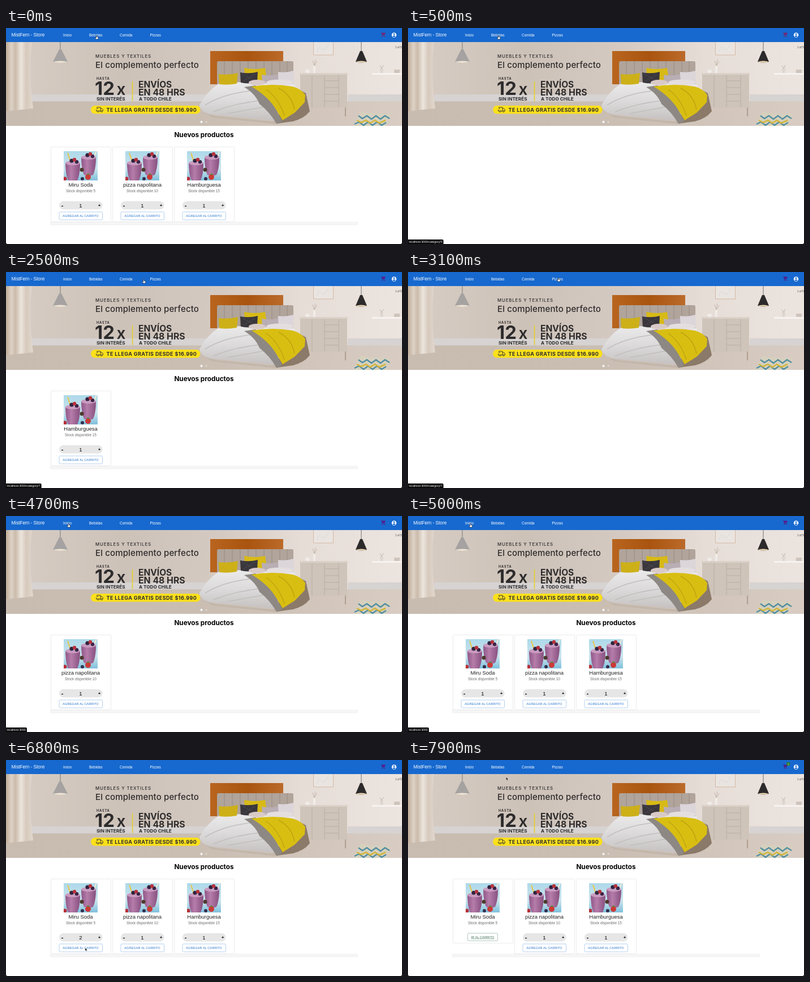
Animation, 700 px wide and 384 px high, one loop 8 s. Source, as an HTML page:

```html
<!DOCTYPE html>
<html lang="es">
<head>
<meta charset="utf-8">
<title>Tienda</title>
<style>
html, body { margin: 0; width: 100%; height: 100%; overflow: hidden; background: #fff }
svg { display: block; width: 700px; height: 384px; font-family: "Liberation Sans", Arial, sans-serif }
.ad { font-family: Inter, "Open Sans", sans-serif; font-weight: 700; fill: #2d2b2c }
.mid { text-anchor: middle }
</style>
</head>
<body>
<svg viewBox="0 0 700 384">
<defs>
  <linearGradient id="wall"><stop offset="0" stop-color="#d8cdc4"/><stop offset=".3" stop-color="#cdc2b8"/><stop offset=".55" stop-color="#d5cac2"/><stop offset=".75" stop-color="#e6ddd7"/><stop offset="1" stop-color="#ece4df"/></linearGradient>
  <linearGradient id="floor"><stop stop-color="#c8bcb0"/><stop offset=".5" stop-color="#cabeb3"/><stop offset="1" stop-color="#d8ccc3"/></linearGradient>
  <linearGradient id="curtain"><stop stop-color="#bfab97"/><stop offset=".2" stop-color="#ddd2c6"/><stop offset=".35" stop-color="#cbbbaa"/><stop offset=".55" stop-color="#ece5dd"/><stop offset=".75" stop-color="#d6c9bc"/><stop offset="1" stop-color="#e2d9cf"/></linearGradient>
  <linearGradient id="wood"><stop stop-color="#b9651f"/><stop offset=".5" stop-color="#a9540f"/><stop offset="1" stop-color="#bb6a2a"/></linearGradient>
  <linearGradient id="sheet" x2="0" y2="1"><stop stop-color="#ebeaeb"/><stop offset=".5" stop-color="#dcdadb"/><stop offset="1" stop-color="#c6c2c1"/></linearGradient>
  <linearGradient id="sky" x2="0" y2="1"><stop stop-color="#add9ea"/><stop offset=".6" stop-color="#cbe4ec"/><stop offset="1" stop-color="#7fc0dc"/></linearGradient>
  <linearGradient id="shake"><stop stop-color="#8f5788"/><stop offset=".4" stop-color="#b67daa"/><stop offset="1" stop-color="#87507f"/></linearGradient>
  <clipPath id="stage"><path d="M0 25H700V174H0z"/></clipPath>
  <g id="glass">
    <path d="M-13 0H13Q13 20 8 31 0 35-8 31-13 20-13 0" fill="url(#shake)"/>
    <ellipse rx="13" ry="4" fill="#c99bbf"/>
    <circle cx="-2" cy="-4" r="3.6" fill="#2f2440"/><circle cx="7" cy="-2" r="3.2" fill="#3b2547"/>
    <circle cx="3" cy="-6" r="3.2" fill="#b8323a"/>
  </g>
  <symbol id="photo" viewBox="0 0 60 52">
    <path d="M0 0H60V52H0z" fill="url(#sky)"/>
    <path d="M13 22 7 3" stroke="#e9c648" stroke-width="2"/><path d="M53 10 58 0" stroke="#f3ead0" stroke-width="2"/>
    <use href="#glass" x="44" y="11"/><use href="#glass" x="16" y="21"/>
    <circle cx="32" cy="33" r="3.5" fill="#4b3a2c"/><circle cx="2" cy="49" r="3.5" fill="#b8323a"/>
    <circle cx="43" cy="46" r="5" fill="#cc3a37"/><path d="M40 42l3-3 4 3z" fill="#5c8a3c"/><circle cx="33" cy="49" r="3" fill="#35304f"/>
  </symbol>
</defs>

<!-- banner -->
<g clip-path="url(#stage)">
  <path d="M0 25H700V130H0z" fill="url(#wall)"/>
  <path d="M0 130H700V174H0z" fill="url(#floor)"/>
  <path d="M46 118H365V130.500H46zM604 118H700V130.500H604z" fill="#d6d3d2"/>
  <path d="M0 25H46Q40 80 48 143L0 148z" fill="url(#curtain)"/>
  <path d="M96 25V39" stroke="#777"/><path d="M94 38h4l11 22q-13 4-26 0z" fill="#a5a2a1"/><path d="M83 60q13 4 26 0-13-3-26 0" fill="#eee5d4"/>
  <path d="M628 25V42" stroke="#555" stroke-width=".8"/><path d="M626 41h4l8 19q-10 3-20 0z" fill="#2c2a2b"/><path d="M618 60q10 3 20 0-10-3-20 0" fill="#e9d5b4"/>
  <path d="M543.500 20H578.500V48H543.500z" fill="#e9e4e0" stroke="#d5b9a5"/><path d="M550 42q3-12 8-5t12-9" fill="none" stroke="#d3d5d4" stroke-width=".8"/>
  <path d="M647 80H700V83H647z" fill="#f6f3f0"/><path d="M661 72h6l-1 8h-4z" fill="#ddd5cf"/><path d="M686 74h10v6h-10z" fill="#cfc5bd"/><path d="M664 72l-3-5m3 5 3-6" stroke="#a89e92" stroke-width=".7"/>
  <path d="M524 141v16M600 141v16" stroke="#a3907f" stroke-width="1.500"/>
  <path d="M520 81H603V141.500H520z" fill="#cfc4ba"/><path d="M519 80H604V83H519z" fill="#dbd1c8"/>
  <path d="M563 84V141M588 84V141M563 94H588M563 106H588M563 118H588M563 130H588M541 84V141" stroke="#b3a599" stroke-width=".7"/>
  <path d="M543 80V70q0-3 2-3t2 3v10z" fill="#f0ece7"/><path d="M545 67l-3-9m3 9 2-11m-2 11 5-8" stroke="#b5a896" stroke-width=".7"/><ellipse cx="533" cy="77" rx="4" ry="3" fill="#f0ece7"/>
  <path d="M361 41H490V100H361z" fill="url(#wood)"/>
  <rect x="373" y="59" width="135" height="60" rx="3" fill="#b0a49b"/>
  <path d="M386 59V100M400 59V100M414 59V100M428 59V100M442 59V100M456 59V100M470 59V100M484 59V100M497 59V100" stroke="#93877f" stroke-width=".8"/>
  <path d="M352 150 372 157 470 166 531 150V156L478 171 364 159z" fill="#c3b6aa"/>
  <path d="M376 99Q442 92 510 100L520 148 470 164 362 154Q344 149 342 137 355 113 376 99z" fill="url(#sheet)"/>
  <path d="M352 137Q382 118 430 112M366 149Q407 133 451 129M392 152Q425 146 458 140" fill="none" stroke="#c2bebe" stroke-width="1.500"/>
  <path d="M421 71q19 4 37 0l3 21q-20 5-38 0z" fill="#d8ba16"/><path d="M376 82q17 2 34-2l-2 19q-16 3-31 1z" fill="#cdb018"/>
  <path d="M414 79q16 3 31-1l-1 19q-14 3-29 0z" fill="#3a373c"/><path d="M418 82l22 12m-20 0 21-12" stroke="#5f5b62" stroke-dasharray="2 2"/>
  <path d="M481 78q14 2 27-2l1 23q-16 3-28 0z" fill="#dcd5da"/><path d="M452 83q15 3 29-1l1 15q-16 4-29 0z" fill="#b9aeb4"/>
  <ellipse cx="444" cy="97" rx="15" ry="5" fill="#d9cac7"/><ellipse cx="484" cy="97" rx="24" ry="5.500" fill="#e4dedf"/>
  <path d="M495 108Q520 108 530 116L537 148Q527 161 507 166L478 170z" fill="#8b7a69"/>
  <path d="M421 105 441 102Q463 119 476 141L488 166 478 170Q466 149 448 135 441 117 421 105z" fill="#8d8883"/>
  <path d="M434 104Q472 98 506 104 522 108 529 119L528 132 511 150 489 164 478 146Q464 122 434 104z" fill="#d9be12"/>
  <path d="M460 109Q483 126 492 156M482 107Q505 119 510 145" fill="none" stroke="#bea40f" stroke-width="1.500"/>
  <path d="M627 149Q650 154 680 152L671 174H614z" fill="#d6d0bd"/>
  <path d="M623 156l7 5 8-5 8 6 8-6 8 6 8-6 8 5M616 171l8-4 8 6 8-6 8 6 8-6 8 6 8-5" fill="none" stroke="#528ea0" stroke-width="2.500"/>
  <path d="M620 164l8 4 8-4 8 5 8-5 8 5 11-5" fill="none" stroke="#d2b63c" stroke-width="2.500"/>
  <g class="ad">
    <text x="158" y="52.500" font-size="7.800" letter-spacing=".9" font-weight="500">MUEBLES Y TEXTILES</text>
    <text x="158" y="71" font-size="15" letter-spacing=".14" font-weight="500">El complemento perfecto</text>
    <text x="160" y="91.500" font-size="5.500" letter-spacing=".9">HASTA</text>
    <text x="157" y="119" font-size="33">12</text><text x="195.500" y="119" font-size="28" font-weight="600">x</text>
    <text x="160" y="128.500" font-size="8.200">SIN INTERÉS</text>
    <path d="M223.500 95V130" stroke="#e6cf22" stroke-width="1.500"/>
    <text x="234" y="106" font-size="15.500">ENVÍOS</text>
    <text x="234" y="119.700" font-size="15.800">EN 48 HRS</text>
    <text x="235" y="128.500" font-size="8.200">A TODO CHILE</text>
    <rect x="150" y="138" width="193.500" height="14.500" rx="7.250" fill="#fbe01b"/>
    <path d="M161 147.500h-1.500V145M160 141h7v6.500h-3M167 143h2.500l1.800 2v2.500H170M160 143h3" fill="none" stroke="#2d2b2c" stroke-width=".9"/>
    <g fill="none" stroke="#2d2b2c" stroke-width=".9"><circle cx="162.700" cy="148.200" r="1.300"/><circle cx="168.700" cy="148.200" r="1.300"/></g>
    <text x="177.500" y="148.500" font-size="9" letter-spacing=".42">TE LLEGA GRATIS DESDE $16.990</text>
  </g>
  <circle cx="345.500" cy="167" r="1.900" fill="#fff"/><circle cx="354" cy="167" r="1.400" fill="#e4ddd6"/>
  <text x="688" y="36" font-size="4.600" fill="#444">1 of 5</text>
</g>

<!-- app bar -->
<path d="M0 0H700V25H0z" fill="#1769cf"/>
<g fill="#fff" font-size="6.500">
  <text x="9.500" y="15" font-size="8.200">MistFern - Store</text>
  <text x="101" y="14.700">Inicio</text><text x="147" y="14.700">Bebidas</text><text x="201" y="14.700">Comida</text><text x="254.500" y="14.700">Pizzas</text>
  <circle cx="686" cy="12.500" r="4.200"/>
</g>
<circle cx="686" cy="11" r="1.400" fill="#1769cf"/><path d="M683.300 14.500q2.700-2.400 5.400 0-2.700 3-5.400 0" fill="#1769cf"/>
<path id="cart" transform="translate(662.300 7) scale(.4)" d="M7 18a2 2 0 1 0 .1 0M17 18a2 2 0 1 0 .1 0M1 2v2h2l3.600 7.600-1.400 2.400Q4.500 17 7 17h12v-2H7.400l1.100-2H16q1.200 0 1.800-1L21.500 5.500 20.500 4H5.200L4.300 2z"/>
<g id="badge"><circle cx="672.200" cy="7" r="3.300" fill="#2e7d32"/><text class="mid" x="672.200" y="8.600" font-size="4.400" fill="#fff">1</text></g>

<g id="page"></g>
<path d="M0 381.500V384H2.500Q.5 383.500 0 381.500M700 381.500V384H697.500Q699.500 383.500 700 381.500" fill="#222"/>
<g id="status"><path id="tip" fill="#050505"/><text id="url" x="1.500" y="382" font-size="5.200" fill="#fff"></text></g>
<g id="mouse" stroke-linejoin="round">
  <path id="hand" d="M-.7-1.500Q0-2.400.6-1.500V.8L2.800 1.400Q3.400 1.600 3.200 2.400L2.600 5H-.8L-2.500 2.400Q-2.400 1.400-.7 2.400z" fill="#fff" stroke="#111" stroke-width=".6"/>
  <path id="arrow" d="M0 0V5.200L1.200 4.200 2 6 3 5.600 2.200 3.800H3.800z" fill="#111" stroke="#fff" stroke-width=".35"/>
</g>
</svg>
<script>
const $ = id => document.getElementById(id);
const products = [['Miru Soda', 5], ['pizza napolitana', 10], ['Hamburguesa', 15]];

// [start, indexes of the listed products]; an empty list is a page being loaded
const pages = [[0, [0, 1, 2]], [400, []], [700, [0]], [1500, []], [1800, [2]], [2800, []], [3200, [1]], [4800, []], [5000, [0, 1, 2]]];
const host = 'localhost:3000';
const links = [[0, ''], [100, '/category/5'], [1400, '/category/6'], [2400, '/category/7'], [3800, '/category/6'],
  [4000, '/category/5'], [4500, ' '], [5400, '/items/3X3CzuPTofRbbnrUBI8'], [6000, '']];
const path = [[0, 160, 15], [1100, 160, 15], [1300, 202.500, 17], [2200, 202.500, 17], [2500, 243.500, 15], [2700, 266, 12],
  [3500, 266, 12], [4400, 110.500, 15], [5100, 110.500, 15], [5800, 165, 319], [6400, 165, 318], [6700, 140, 334],
  [6900, 140, 334], [7400, 233, 75], [7500, 233, 75], [7900, 173.500, 30.500]];

const at = (list, t) => list.findLast(e => e[0] <= t);

function pointer(t) {
  const i = path.indexOf(at(path, t)), a = path[i], b = path[i + 1] || a;
  const u = (t - a[0]) / (b[0] - a[0] || 1), e = u * u * (3 - 2 * u);
  return [a[1] + (b[1] - a[1]) * e, a[2] + (b[2] - a[2]) * e];
}

const label = (x, y, size, text, more = '') => `<text class="mid" x="${x}" y="${y}" font-size="${size}" ${more}>${text}</text>`;
const box = (x, y, w, h, more) => `<rect x="${x}" y="${y}" width="${w}" height="${h}" ${more}/>`;

function card(id, slot, t) {
  const [name, stock] = products[id];
  const added = id === 0 && t >= 6900;
  const qty = id === 0 && t >= 6100 ? 2 : 1;
  const buy = added
    ? box(26.500, 97, 53, 13.500, 'rx="1.500" fill="#fff" stroke="#9dbbae" stroke-width=".8"') +
      label(53, 105.700, 5.450, 'IR AL CARRITO', 'fill="#33694f" letter-spacing=".15" text-decoration="underline"')
    : box(15, 97, 76.500, 14.500, 'rx="7.250" fill="#e6e6e6"') +
      label(20.500, 108, 11, '-', 'font-weight="700"') + label(53, 107.700, 9.500, qty) + label(86, 107, 8, '+', 'font-weight="700"') +
      box(15, 116, 76.500, 14, 'rx="1.500" fill="#fff" stroke="#a3c4ea" stroke-width=".8"') +
      label(53, 125, 5.450, 'AGREGAR AL CARRITO', 'fill="#1f6fcb" letter-spacing=".15"');
  return `<g transform="translate(${79 + slot * 109} 211)">` +
    box(.5, .5, 106, added ? 114 : 133, 'rx="1" fill="#fff" stroke="#ebebeb"') +
    '<use href="#photo" x="23" y="8" width="60" height="52"/>' +
    label(53, 71, 9.450, name, 'fill="#222"') +
    label(53, 80.500, 6.450, 'Stock disponible ' + stock, 'fill="#6b6b6b"') + buy + '</g>';
}

function draw(t) {
  const shown = at(pages, t)[1];
  $('page').innerHTML = shown.length
    ? label(350, 194, 11.750, 'Nuevos productos', 'font-weight="700" font-family="Inter, sans-serif"') +
      box(78.500, 345, 543, 5, 'fill="#f6f6f6" stroke="#ececec" stroke-width=".6"') +
      shown.map((id, slot) => card(id, slot, t)).join('')
    : '';

  const link = at(links, t)[1], url = link && host + link.trim();
  $('url').textContent = url;
  const w = url ? $('url').getComputedTextLength() + 3.500 : 0;
  $('tip').setAttribute('d', `M0 376H${w - 2}q2 0 2 2V384H0z`);
  $('status').setAttribute('opacity', !url ? 0 : t < 5400 ? 1 : Math.min(1, Math.max(0, (5950 - t) / 430)));

  $('cart').setAttribute('fill', t < 1900 ? '#75266f' : '#561a86');
  $('badge').setAttribute('opacity', t < 6900 ? 0 : 1);

  const [x, y] = pointer(t), hand = y < 25;
  $('mouse').setAttribute('transform', `translate(${x} ${y})`);
  $('hand').setAttribute('opacity', hand ? 1 : 0);
  $('arrow').setAttribute('opacity', hand ? 0 : 1);
}

let last = -1;
function tick() {
  const t = Math.floor(performance.now() % 8000 / 100) * 100; // ten pictures a second
  if (t !== last) draw(last = t);
  requestAnimationFrame(tick);
}
tick();
</script>
</body>
</html>
```
